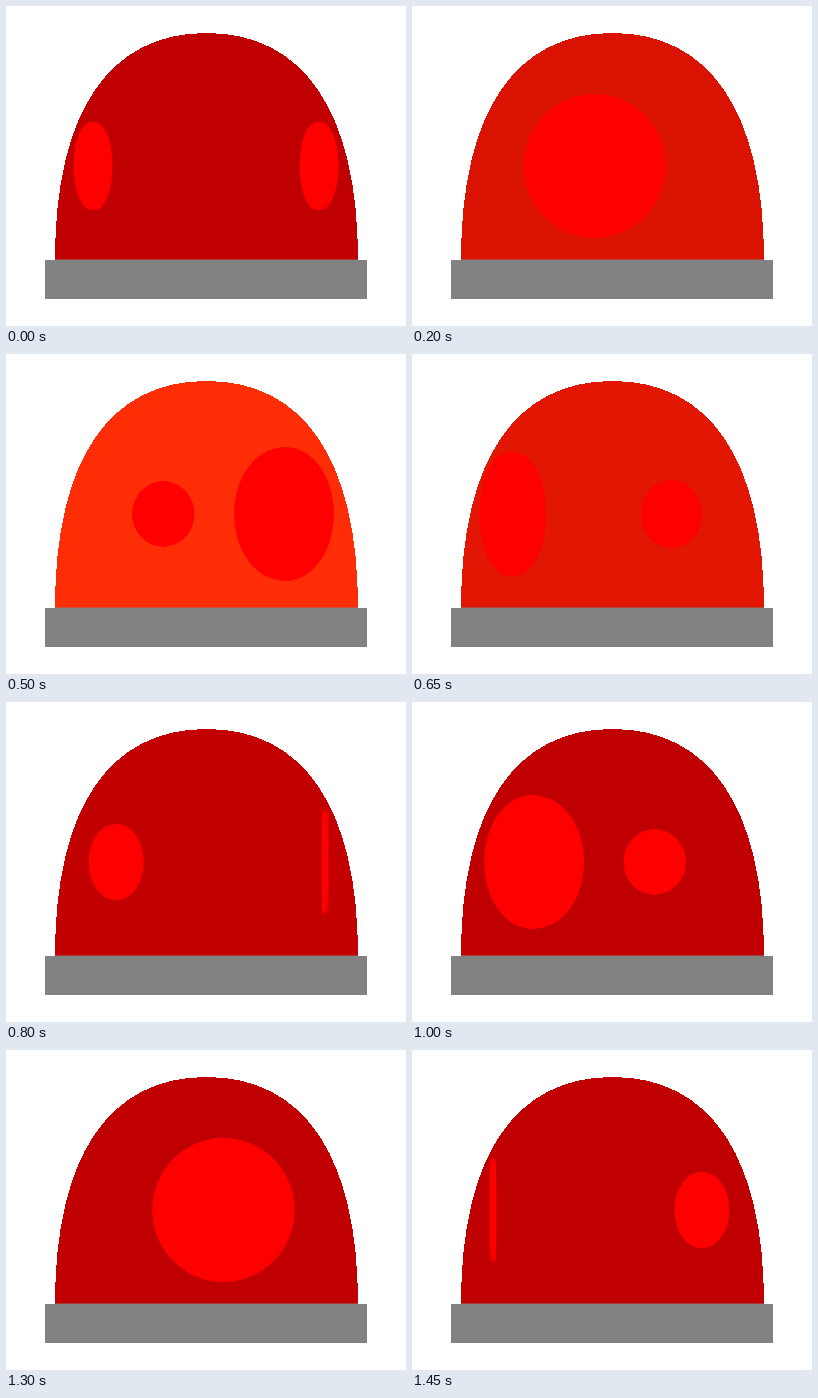
Write an HTML page without scripts that moves like this. It is 400x320 px and loops after 1500 ms.

```html
<!DOCTYPE html>
<html lang="en">
<head>
<meta charset="utf-8">
<title>Rotating beacon</title>
<style>
  @property --turn {
    syntax: "<angle>";
    inherits: true;
    initial-value: 90deg;
  }

  html, body { margin: 0; width: 100%; height: 100%; overflow: hidden; background: #fff; }
  svg { display: block; width: 400px; height: 320px; animation: spin 750ms steps(15) infinite; }

  .dome { fill: #c00000; shape-rendering: crispEdges; animation: glow 1500ms infinite; }
  .base { fill: #828282; }
  .seam { stroke: #828282; stroke-opacity: .45; }

  .lamp { --phi: var(--turn); fill: #f00; }
  .opposite { --phi: calc(var(--turn) + 180deg); }

  /* Perspective view of a disc facing outward at distance --r from the axis */
  .lamp ellipse {
    --eye: 280;
    --size: 43.3;
    --sin: sin(var(--phi));
    --cos: cos(var(--phi));
    --depth: calc(var(--eye) - var(--r) * var(--cos));
    --tilt: calc(var(--size) * var(--sin));
    --x: calc(var(--r) * var(--sin));
    --half: calc(var(--size) * var(--cos));
    --a: calc(var(--eye) * (var(--x) + var(--half)) / (var(--depth) + var(--tilt)));
    --b: calc(var(--eye) * (var(--x) - var(--half)) / (var(--depth) - var(--tilt)));
    --width: calc((var(--a) - var(--b)) / 2);
    cx: calc((200 + (var(--a) + var(--b)) / 2) * 1px);
    cy: 160px;
    rx: calc(max(var(--width), -1 * var(--width)) * 1px);
    ry: calc(var(--size) * var(--eye) * 1px
      / sqrt(var(--depth) * var(--depth) - var(--tilt) * var(--tilt)));
  }

  @keyframes spin {
    from { --turn: 90deg; }
    to { --turn: -270deg; }
  }
  @keyframes glow {
    0% { fill: #c00000; animation-timing-function: steps(10); }
    33.3333% { fill: #fe2d06; animation-timing-function: steps(6); }
    53.3333% { fill: #c30000; animation-timing-function: steps(1); }
    56.6667%, 100% { fill: #c00000; }
  }
</style>
</head>
<body>
<svg viewBox="0 0 400 320">
  <path class="dome" d="M49 254C49 104 104.5 27 200.5 27S352 104 352 254Z"/>
  <path class="seam" d="M49 253.5H352"/>
  <rect class="base" x="39" y="254" width="322" height="39"/>
  <!-- stacked slices give each lamp its thickness -->
  <g class="lamp">
    <ellipse style="--r:108"/>
    <ellipse style="--r:108.5"/>
    <ellipse style="--r:109"/>
    <ellipse style="--r:109.5"/>
    <ellipse style="--r:110"/>
    <ellipse style="--r:110.5"/>
    <ellipse style="--r:111"/>
    <ellipse style="--r:111.5"/>
    <ellipse style="--r:112"/>
  </g>
  <g class="lamp opposite">
    <ellipse style="--r:108"/>
    <ellipse style="--r:108.5"/>
    <ellipse style="--r:109"/>
    <ellipse style="--r:109.5"/>
    <ellipse style="--r:110"/>
    <ellipse style="--r:110.5"/>
    <ellipse style="--r:111"/>
    <ellipse style="--r:111.5"/>
    <ellipse style="--r:112"/>
  </g>
</svg>
</body>
</html>
```
